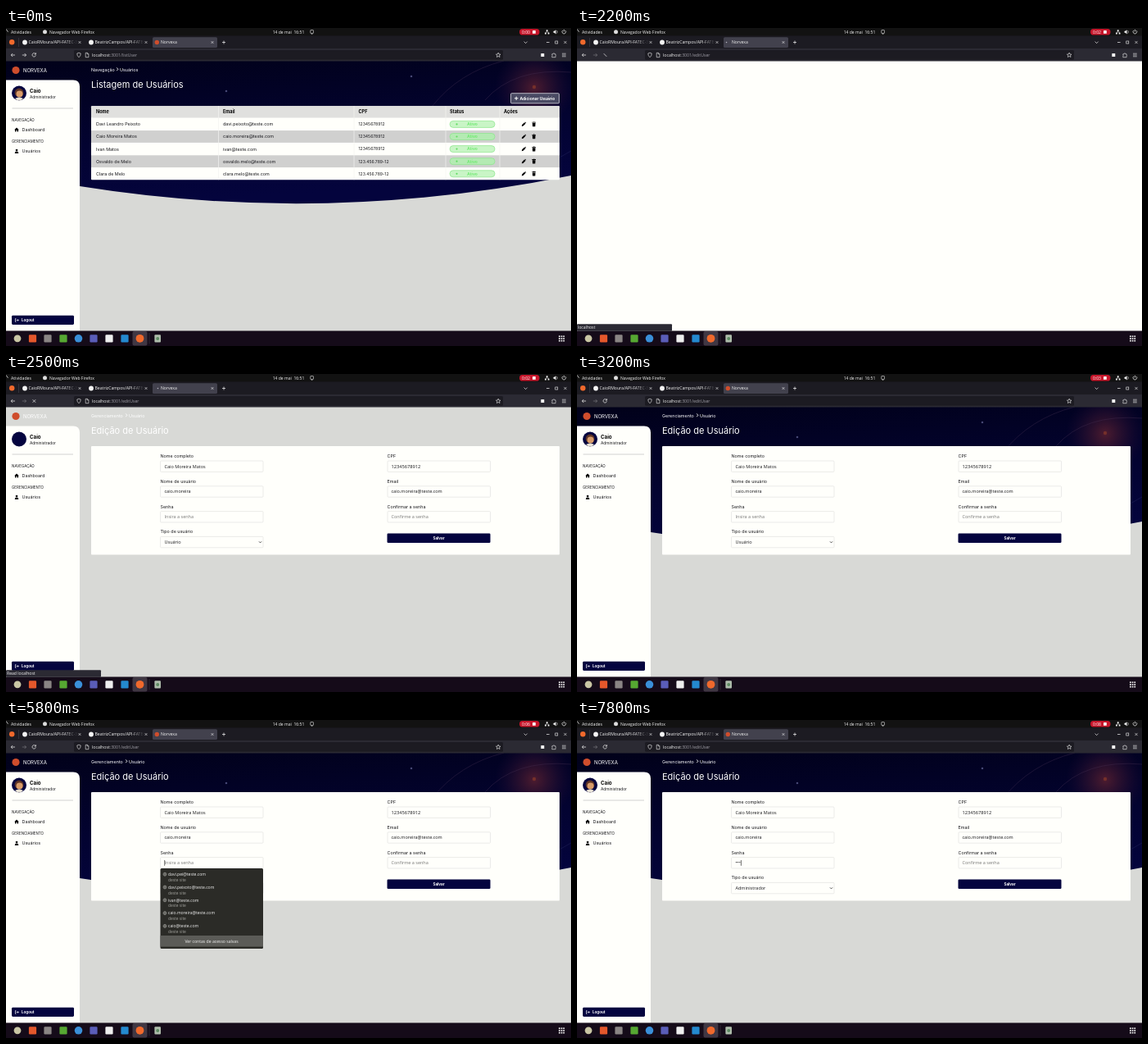
An HTML page for the animation above (8000 ms loop, 690 by 388 pixels).

```html
<!DOCTYPE html>
<html lang="pt-BR">
<head>
<meta charset="utf-8">
<title>Edição de Usuário</title>
<style>
html, body { margin: 0; width: 100%; height: 100%; overflow: hidden; background: #d8d9d6; }
svg { display: block; width: 100%; height: 100%; }
text { font-family: "Open Sans", "Noto Sans", sans-serif; white-space: pre; }
.app { font-family: Inter, sans-serif; }
.b { font-weight: 700; }
.m { text-anchor: middle; }
</style>
</head>
<body>
<svg id="stage" viewBox="0 0 690 388" preserveAspectRatio="none"></svg>
<script>
const NAVY = '#04043f', PAPER = '#fffffb', INK = '#17171c', PALE = '#f4f4f4', GREY = '#d8d9d6';

// Shape helpers; text is placed by its vertical centre.
const rect = (x, y, w, h, fill, r = 0, more = '') =>
  `<rect x="${x}" y="${y}" width="${w}" height="${h}" rx="${r}" fill="${fill}" ${more}/>`;
const circle = (x, y, r, fill, more = '') => `<circle cx="${x}" cy="${y}" r="${r}" fill="${fill}" ${more}/>`;
const line = (d, stroke = PALE, w = .8, more = '') =>
  `<path d="${d}" fill="none" stroke="${stroke}" stroke-width="${w}" ${more}/>`;
const fill = (d, color) => `<path d="${d}" fill="${color}"/>`;
const text = (x, y, s, size, color, cls = '', id = '') =>
  `<text x="${x}" y="${y + size * .36}" font-size="${size}" fill="${color}" class="${cls}"${id && ` id="${id}"`}>${s}</text>`;
const app = (x, y, s, size = 5.4, color = INK, cls = '') => text(x, y, s, size, color, 'app ' + cls);
const group = (id, inner, more = '') => `<g id="${id}" ${more}>${inner}</g>`;
const at = (x, y, inner) => `<g transform="translate(${x} ${y})">${inner}</g>`;
const cross = (x, y, r = 1.4, w = .6) =>
  line(`M${x - r} ${y - r}l${2 * r} ${2 * r}m0 ${-2 * r}l${-2 * r} ${2 * r}`, PALE, w);

const pencil = (x, y) => at(x, y,
  fill('M-2.5 2.6l.4-1.9L.8-2.1 2.2-.7-.7 2.2zM1.2-2.4l.5-.5 1.3 1.3-.5.5z', '#000'));
const trash = (x, y) => at(x, y,
  fill('M-2.3-2.6h1.3l.4-.4h1.2l.4.4h1.3v.8h-4.6zM-1.9-1.4h3.8l-.3 4.2h-3.2z', '#000'));
const home = (x, y) => at(x, y, fill('M-2.8.2L0-2.4 2.8.2H2v2.2H.6V.8H-.6v1.6H-2V.2z', '#000'));
const person = (x, y) => at(x, y, circle(0, -1.3, 1.3, '#000') + fill('M-2.3 2.6q0-2.3 2.3-2.3t2.3 2.3z', '#000'));
const chevron = x => line(`M${x - .8} 48.4l1.7 1.9l-1.7 1.9`, '#fff', .9);

function browser() {
  const githubTab = (x, s) => circle(x, 17.5, 2.9, PALE) +
    text(x + 4.5, 17.5, s, 5.15, 'url(#tab' + (x < 50 ? 1 : 2) + ')') + cross(x + 67, 17.5);
  return rect(0, 0, 690, 10, '#121212') +
    line('M0 1.3l2.5 3.5', '#ddd', .8) +
    text(6, 4.8, 'Atividades', 5.2, PALE) + circle(47.5, 4.8, 2.5, '#ddd') +
    text(53, 4.8, 'Navegador Web Firefox', 5.05, PALE) +
    text(345, 4.8, '14 de mai  16:51', 5.05, PALE, 'm') +
    rect(371.8, 2.5, 3.6, 4, 'none', .6, `stroke="${PALE}" stroke-width=".6"`) +
    line('M372.8 7.5h1.6', PALE, .5) +
    rect(627, 1.1, 24.5, 7.5, '#c7162b', 3.7) + text(630, 4.8, '0:00', 5, '#fff', '', 'clock') +
    rect(643, 3, 3.8, 3.8, '#fff', .4) +
    fill('M659.8 2.3h1.8v1.7h-1.8zM658 5.7h1.8v1.7H658zM661.7 5.7h1.8v1.7h-1.8z', PALE) +
    line('M660.7 4v1m-1.8.8v-.8h3.7v.8', PALE, .5) +
    fill('M668.5 3.8h1.2l1.8-1.6v5.2l-1.8-1.6h-1.2z', PALE) + line('M672.6 3q1.5 1.8 0 3.6', PALE, .6) +
    line('M680 2.8a2.3 2.3 0 1 0 2.8 0M681.4 1.8v2.7', PALE, .7) +
    // tab strip
    rect(0, 9.5, 690, 16, '#1c1b22') + circle(7.2, 17.3, 3.2, '#f0692c') +
    line('M15.5 12v11', '#45444e', .6) +
    githubTab(23, 'CaioRMoura/API-FATEC-3') + githubTab(104, 'BeatrizCampos/API-FATEC') +
    rect(179, 11.2, 79, 12.8, '#42414d', 1.6) +
    group('favicon', circle(184.3, 17.5, 2.7, '#cf4d2c')) +
    group('throb', circle(0, 17.5, .8, '#b9b8c4')) +
    text(189, 17.5, 'Norvexa', 5.1, PALE) + cross(252, 17.5) +
    line('M264 17.5h4m-2-2v4M632.6 16.6l2 2l2-2M660 17.5h3.6', PALE, .7) +
    rect(670.8, 16, 3, 3, 'none', 0, `stroke="${PALE}" stroke-width=".6"`) + cross(683, 17.5, 1.6) +
    // address bar
    rect(0, 25, 690, 15.5, '#2b2a33') + rect(83, 27, 524, 11.8, '#1c1b22', 1.6) +
    line('M11 33H6.2m2-2l-2 2l2 2', PALE, .7) +
    group('forward', line('M19.8 33h4.8m-2-2l2 2l-2 2', PALE, .7)) +
    group('reload', line('M36 31.5a2.2 2.2 0 1 0 .4 1.8M36.5 30.3v1.8h-1.8', PALE, .7)) +
    group('stopping', line('M32.7 31.2l3.5 3.6', PALE, .7)) +
    group('stop', cross(34.4, 33, 1.8, .7)) +
    line('M89 30.2l2.2.8q.1 3.2-2.2 4.8q-2.3-1.6-2.2-4.8z', PALE, .6) +
    line('M97.2 30.3h2.3l1.4 1.4v4h-3.7zM99.3 30.5v1.4h1.4', PALE, .6) +
    `<text x="105" y="34.9" font-size="5.2" fill="${PALE}">localhost<tspan fill="#a09fa8">:3001/<tspan id="route">listUser</tspan></tspan></text>` +
    line('M601.2 30.1l.8 1.9 2 .2-1.5 1.3.5 2-1.8-1.1-1.8 1.1.5-2-1.5-1.3 2-.2z', PALE, .6) +
    rect(653.3, 31, 4, 4, PALE, .3) +
    line('M666.8 31.8h1.2a1 1 0 0 1 2 0h1.1v1.3a1 1 0 0 1 0 1.5v1.1h-4.3v-1.2a1 1 0 0 0 0-1.5z', PALE, .6) +
    line('M679 31.2h4.8m-4.8 1.8h4.8m-4.8 1.8h4.8', PALE, .6);
}

function dock() {
  const icons = [[14, '#c9c6a4', 4.4], [32.5, '#e4572b', 0], [51, '#8a8584', 0], [70, '#56a832', 0], [88.5, '#3a8fd8', 4.8],
    [107, '#5a5db8', 0], [126, '#eeeeee', 0], [145, '#2489cf', 0]];
  let s = rect(0, 369.5, 690, 18.5, '#150b19') + rect(154.5, 370, 18, 17.5, '#403743', 2);
  for (const [x, c, r] of icons) s += r ? circle(x, 378.8, r, c) : rect(x - 4.6, 374.2, 9.2, 9.2, c, 1.2);
  s += circle(163.5, 378.8, 4.9, '#f0692c') + line('M175 372v13.5', '#423a44', .6) +
    rect(181.4, 374.2, 7.6, 9.4, '#aebcab', 1) + circle(185.2, 379, 2, '#5d8a62');
  for (let i = 0; i < 9; i++) s += rect(675 + i % 3 * 2.7, 375.4 + Math.floor(i / 3) * 2.7, 1.7, 1.7, PALE);
  return s;
}

function space() {
  const star = (x, y) => line(`M${x - 1.2} ${y}h2.4m-1.2-1.2v2.4`, '#8c8fc5', .6);
  return fill('M0 40H690V180Q390 241 90 193L0 176z', 'url(#sky)') +
    circle(645, 73, 48, 'url(#glow)', 'clip-path="url(#page)"') +
    `<g clip-path="url(#page)">` +
    line('M520 96Q553 54 608 40M585 88Q620 48 690 54', '#4b3458', .5, 'opacity=".7"') +
    line('M540 186Q600 205 690 150', '#23245c', .5) + '</g>' +
    star(495, 59) + star(269, 77) + circle(645, 72, 2.2, '#75302b');
}

function sidebar() {
  return fill('M0 63.5H82Q90 63.5 90 71.5V369.5H0z', PAPER) +
    circle(16, 79.5, 9, NAVY) + group('face',
      circle(16, 79, 5.4, '#5d3426') + circle(16.5, 80.5, 4, '#d79b6a') + fill('M11 86q5-3 10 0q-5 5-10 0z', '#e8e2d6')) +
    line('M7.5 98H82', '#bdbdbd', .7) + home(13, 124) + person(13, 150.3);
}
const sideText = app(29, 76.3, 'Caio', 6.2, '#000', 'b') + app(29, 84, 'Administrador', 4.8) +
  app(7, 112, 'NAVEGAÇÃO', 4.5) + app(19.5, 124, 'Dashboard') +
  app(7, 138.5, 'GERENCIAMENTO', 4.5) + app(19.5, 150.5, 'Usuários');
const logout = rect(7, 350.8, 76, 11.2, NAVY, 1.4) +
  line('M12.4 354.6h-1v3.8h1M12.6 356.5h2.6m-1-1.2l1.2 1.2l-1.2 1.2', '#fff', .7) +
  app(19, 356.5, 'Logout', 4.5, '#fff', 'b');
const logo = circle(12, 51.5, 4.6, '#cf4d2c') + app(21, 51.5, 'NORVEXA', 6, '#fff');

const heading = (crumb, x, here, title) => app(104, 51, crumb, 5.4, '#fff') + chevron(x) +
  app(x + 2.9, 51, here, 5.4, '#fff') + app(104, 68.7, title, 11, '#fff');

function listPage() {
  const cols = [110, 265, 430.5, 542, 608];
  const people = [
    ['Davi Leandro Peixoto', 'davi.peixoto@teste.com', '12345678912'],
    ['Caio Moreira Matos', 'caio.moreira@teste.com', '12345678912'],
    ['Ivan Matos', 'ivan@teste.com', '12345678912'],
    ['Osvaldo de Melo', 'osvaldo.melo@teste.com', '123.456.789-12'],
    ['Clara de Melo', 'clara.melo@teste.com', '123.456.789-12']];
  let s = heading('Navegação', 136, 'Usuários', 'Listagem de Usuários') +
    rect(616.5, 79.7, 59, 12.2, '#4a4a63', 1, 'stroke="#d5d5df" stroke-width=".8"') +
    line('M621 85.8h4.4m-2.2-2.2v4.4', '#fff', 1) + app(627.5, 85.8, 'Adicionar Usuário', 4.9, '#fff', 'b') +
    rect(104, 95.2, 572, 90, PAPER, 1) + rect(104, 95.2, 572, 14.4, '#e0e0de', 1);
  ['Nome', 'Email', 'CPF', 'Status', 'Ações'].forEach((h, i) => s += app(cols[i], 102.5, h, 5.5, '#000', 'b'));
  people.forEach((p, i) => {
    const y = 117.4 + 15.1 * i, odd = i % 2;
    if (odd) s += rect(104, y - 7.4, 572, 14.8, '#d0d0cf');
    p.forEach((v, j) => s += app(cols[j], y, v, j == 2 ? 5.1 : 5.4));
    s += rect(542, y - 4, 55, 8, odd ? '#b4eab3' : '#c9f5c6', 4, 'stroke="#8ce58b" stroke-width=".7"') +
      circle(550.5, y, 1.1, '#62dd63') + app(569.5, y, 'Ativo', 5, '#73e874', 'm b');
    if (i == 1) s += group('hover', circle(632.3, y, 4.7, '#8f8f8f'));
    s += pencil(632.3, y) + trash(644.7, y);
  });
  for (const x of [259.5, 425, 537, 603]) s += line(`M${x} 95.2v90`, '#f4f4f1', .7);
  return s;
}

const box = (x, y) => rect(x, y - 6.7, 125.5, 13.4, PAPER, 1, 'stroke="#e3e3e1" stroke-width=".7"');
const arrow = y => line(`M309 ${y - .7}l1.5 1.5l1.5-1.5`, '#222', .8);

// Form with its first row centred on y; the middle rows are left to the caller.
function form(top, height, y, step, name) {
  const L = 188.5, Rt = 466, row = i => y + step * i;
  let s = rect(104, top, 572, height, PAPER, 1);
  for (let i = 0; i < 4; i++) s += box(L, row(i)) + (i < 3 ? box(Rt, row(i)) : '');
  return s + text(193.5, row(0), name, 5.5, INK) + text(470.5, row(0), '12345678912', 5.7, INK) +
    text(193.5, row(1), 'caio.moreira', 5.5, INK) + text(470.5, row(1), 'caio.moreira@teste.com', 5.5, INK) +
    text(470.5, row(2), 'Confirme a senha', 5.5, '#777') + arrow(row(3)) +
    rect(465.5, row(3) - 10.6, 126, 11.5, NAVY, 1.2) +
    app(528.5, row(3) - 4.8, 'Salvar', 4.6, '#fff', 'm b');
}

const skeleton = group('skeleton',
  fill('M0 55H82Q90 55 90 63V369.5H0z', PAPER) + circle(16, 71, 9, NAVY) +
  line('M7.5 89H82', '#bdbdbd', .7) + home(13, 114) + person(13, 139.7) + chevron(151) +
  form(85.3, 130, 109.7, 30.2, 'Caio Moreira') +
  text(193.5, 170.1, 'Insira a senha', 5.5, '#777') + text(193.5, 200.3, 'Usuário', 5.5, INK) + logout);

function editPage() {
  let s = heading('Gerenciamento', 147, 'Usuário', 'Edição de Usuário') + form(88, 132.5, 112.7, 30.8, 'Caio Moreira Matos');
  ['Nome completo', 'Nome de usuário', 'Senha', 'Tipo de usuário'].forEach((v, i) => s += app(188.5, 100 + 30.8 * i, v));
  ['CPF', 'Email', 'Confirmar a senha'].forEach((v, i) => s += app(465.5, 100 + 30.8 * i, v));
  return s + text(193.5, 174.3, 'Insira a senha', 5.5, '#777', '', 'pass') +
    group('caret', rect(0, 171, .6, 6.8, '#111')) + text(193.5, 205, 'Usuário', 5.5, INK, '', 'role');
}

const options = group('options', rect(188.5, 211.8, 125.5, 22.4, PAPER, 0, 'stroke="#c9c9c9" stroke-width=".6"') +
  rect(188.8, 212.1, 124.9, 10.9, '#d5d5d3', 0, 'id="choice"') +
  text(193.5, 217.6, 'Usuário', 5.5, INK) + text(193.5, 228.6, 'Administrador', 5.5, INK));

function logins() {
  let s = rect(188.5, 181, 125.5, 98, '#2b2b27', 1.5);
  ['davi.pei', 'davi.peixoto', 'ivan', 'caio.moreira', 'caio'].forEach((u, i) => {
    const y = 188.2 + 15.8 * i;
    s += circle(194, y, 2, 'none', 'stroke="#b5b5b0" stroke-width=".5"') +
      line(`M192 ${y}h4M194 ${y - 2}q-1.8 2 0 4q1.8-2 0-4`, '#b5b5b0', .4) +
      text(198, y, u + '@teste.com', 5.05, PALE) + text(198, y + 6.8, 'deste site', 4.9, '#a3a39e');
  });
  return s + rect(188.5, 263, 125.5, 13.6, '#5b5b57') + text(251, 270, 'Ver contas de acesso salvas', 5.1, PALE, 'm');
}

const fade = (id, x, stops) => `<linearGradient id="${id}" gradientUnits="userSpaceOnUse" x1="${x}" x2="${x + 17}">${stops}</linearGradient>`;
const fadeStops = `<stop stop-color="${PALE}"/><stop offset="1" stop-color="${PALE}" stop-opacity="0"/>`;

stage.innerHTML = `<defs>${fade('tab1', 71, fadeStops)}${fade('tab2', 152, fadeStops)}
  <linearGradient id="sky" x2=".25" y2="1"><stop stop-color="#010119"/><stop offset=".6" stop-color="#030331"/><stop offset="1" stop-color="#04043d"/></linearGradient>
  <radialGradient id="glow"><stop stop-color="#5a2030" stop-opacity=".85"/><stop offset=".5" stop-color="#351431" stop-opacity=".55"/><stop offset="1" stop-color="#200c35" stop-opacity="0"/></radialGradient>
  <clipPath id="page"><rect y="40" width="690" height="140"/></clipPath></defs>` +
  rect(0, 40, 690, 330, GREY) + group('sky-view', space()) +
  group('side', logo + sidebar() + sideText + logout) +
  group('list', listPage()) + group('edit', editPage()) + options + group('logins', logins()) +
  skeleton + group('blank', rect(0, 40, 690, 330, PAPER)) + browser() + dock() +
  group('status', rect(0, 361.3, 116, 8.4, '#2b2a33', 1) + text(1, 365.5, '', 5.1, PALE, '', 'message'));

const $ = id => document.getElementById(id);
const show = (id, on) => $(id).setAttribute('opacity', +on);
const say = (id, s) => { if ($(id).textContent != s) $(id).textContent = s; };
const within = (t, a, b) => t >= a && t < b;
const ramp = (t, a, b) => Math.min(1, Math.max(0, (t - a) / (b - a)));

function draw(t) {
  const loading = within(t, 2100, 2700), ready = t >= 2700;
  say('clock', '0:0' + Math.floor((t + 200) / 1000));
  say('route', t < 2200 ? 'listUser' : 'editUser');

  show('list', t < 2200);
  show('hover', ramp(t, 1550, 1800));
  show('blank', within(t, 2200, 2300));
  show('skeleton', within(t, 2300, 2500));
  show('side', t < 2200 || t >= 2500);
  show('sky-view', t < 2200 || ready);
  show('face', t < 2200 || ready);
  show('edit', t >= 2500);

  show('favicon', !loading);
  show('throb', loading);
  $('throb').setAttribute('transform', `translate(${184 - 3 * Math.cos((t - 2100) / 600 * 2 * Math.PI)})`);
  show('forward', t < 2200 ? 1 : .35);
  show('reload', t < 2200 || ready);
  show('stopping', within(t, 2200, 2300));
  show('stop', within(t, 2300, 2700));
  show('status', within(t, 2200, 2700));
  say('message', t < 2300 ? 'localhost' : 'Read localhost');

  show('options', within(t, 4100, 4500));
  $('choice').setAttribute('y', t < 4200 ? 212.1 : 223);
  say('role', t < 4500 ? 'Usuário' : 'Administrador');

  const typed = t < 6000 ? 0 : Math.min(3, 1 + Math.floor((t - 6000) / 150));
  say('pass', typed ? '•'.repeat(typed) : 'Insira a senha');
  $('pass').setAttribute('fill', typed ? INK : '#777');
  show('caret', within(t, 5000, 6400) || t >= 7500);
  $('caret').setAttribute('transform', `translate(${193.5 + 2.15 * typed})`);
  show('logins', t < 6000 ? ramp(t, 4950, 5200) : 0);
}

function tick() {
  draw(performance.now() % 8000);
  requestAnimationFrame(tick);
}
tick();
</script>
</body>
</html>
```
